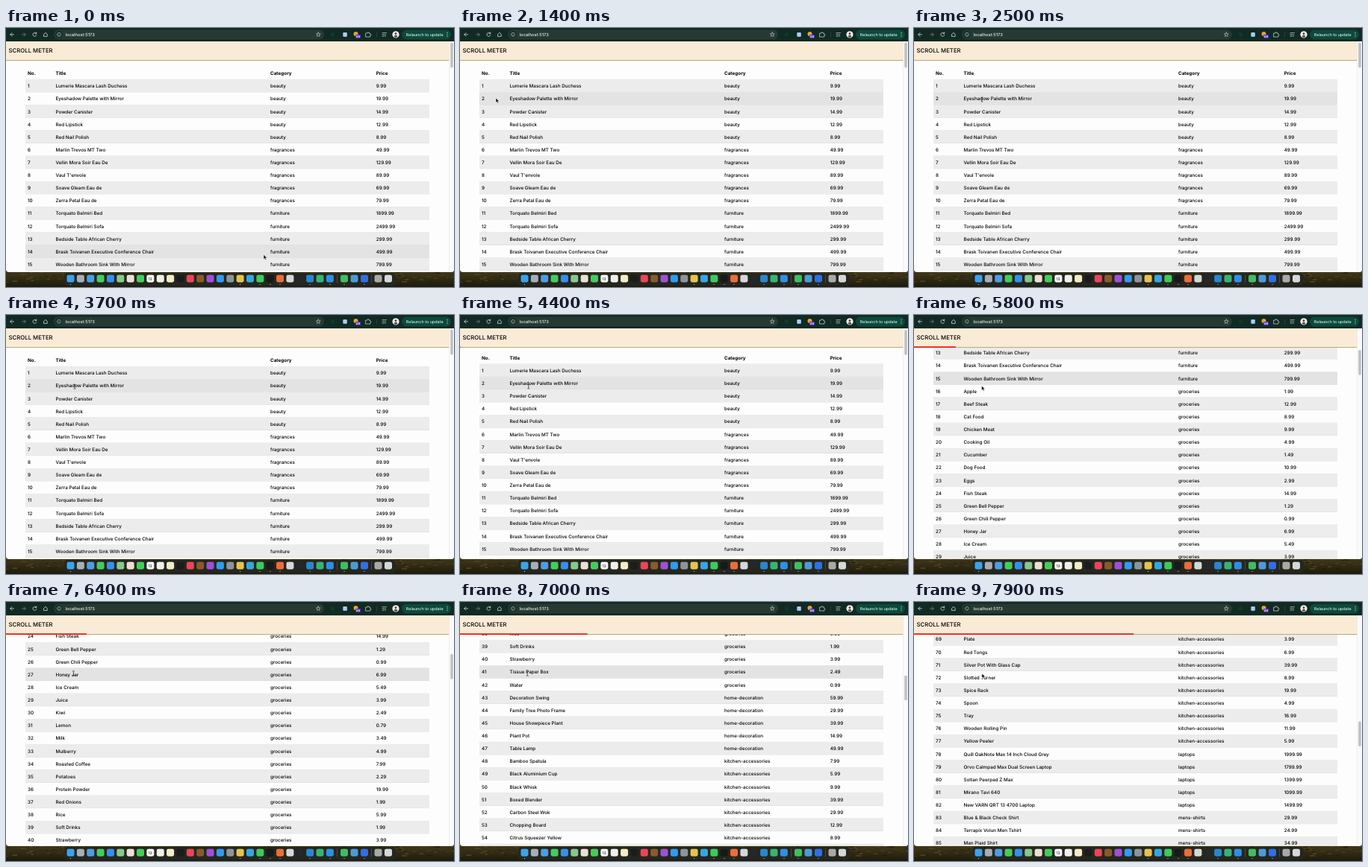
Animation of 600 by 348 pixels, one loop 8000 ms. Source, as an HTML page:

```html
<!DOCTYPE html>
<html lang="en">
<head>
<meta charset="utf-8">
<title>Scroll meter</title>
<style>
  html, body { margin: 0; width: 100%; height: 100%; overflow: hidden; background: #10261f; }
  svg { display: block; width: 100vw; height: 100vh; }
  text { font-family: Inter, Roboto, sans-serif; text-rendering: geometricPrecision; white-space: pre; }
</style>
</head>
<body>
<svg id="stage" viewBox="0 0 600 348" preserveAspectRatio="none">
  <defs>
    <clipPath id="pageClip"><path d="M0 18H600V324Q600 328 596 328H4Q0 328 0 324Z"/></clipPath>
    <linearGradient id="field" x2="0" y2="1">
      <stop offset="0.3" stop-color="#40381a"/><stop offset="1" stop-color="#1d1a0d"/>
    </linearGradient>
  </defs>
  <g id="desktop"><rect y="320" width="600" height="28" fill="url(#field)"/></g>
  <g clip-path="url(#pageClip)">
    <rect y="18" width="600" height="310" fill="#fdfdfd"/>
    <g id="table"></g>
    <rect y="18" width="594" height="25" fill="#faebd7"/>
    <rect y="43" width="594" height="1" fill="#b3ab7e"/>
    <rect id="meter" y="42.2" height="1.7" fill="#f5160c"/>
    <rect x="593.5" y="18" width="6.5" height="310" fill="#fafafa"/>
    <rect x="593.5" y="18" width=".5" height="310" fill="#e4e4e4"/>
    <rect id="thumb" x="595.2" y="19.5" width="3.6" height="34" rx="1.8" fill="#c1c1c1"/>
  </g>
  <g id="chrome"></g>
  <g id="pointer">
    <path id="arrow" d="M0 0V6.3L1.5 5L2.5 7.3L3.6 6.8L2.6 4.6H4.6Z" fill="#111" stroke="#fff" stroke-width=".5"/>
    <path id="beam" d="M-1.4 -3Q0 -3 0 -2.2Q0 -3 1.4 -3M0 -2.2V2.2M-1.4 3Q0 3 0 2.2Q0 3 1.4 3" fill="none" stroke="#222" stroke-width=".7"/>
  </g>
</svg>
<script>
const LOOP = 8000, STEP = 100;
const ROW = 17.12, TOP = 69.45;
const $ = id => document.getElementById(id);

function add(parent, tag, attrs, content) {
  const el = document.createElementNS('http://www.w3.org/2000/svg', tag);
  for (const key in attrs) el.setAttribute(key, attrs[key]);
  if (content !== undefined) el.textContent = content;
  parent.appendChild(el);
  return el;
}
const rect = (parent, x, y, width, height, fill, rx = 0) => add(parent, 'rect', { x, y, width, height, fill, rx });
const circle = (parent, cx, cy, r, fill) => add(parent, 'circle', { cx, cy, r, fill });
const label = (parent, x, middle, size, content, fill = '#000', weight = 500) =>
  add(parent, 'text', { x, y: middle + size * 0.36, 'font-size': size, fill, 'font-weight': weight }, content);
const stroke = (parent, d, color = '#d3ded9', width = 0.8) =>
  add(parent, 'path', { d, fill: 'none', stroke: color, 'stroke-width': width, 'stroke-linecap': 'round', 'stroke-linejoin': 'round' });

// Table contents by category: "title price" items.
const CATALOG = {
  'beauty': 'Lumerie Mascara Lash Duchess 9.99|Eyeshadow Palette with Mirror 19.99|Powder Canister 14.99|Red Lipstick 12.99|Red Nail Polish 8.99',
  'fragrances': "Marlin Trevos MT Two 49.99|Vellin Mora Soir Eau De 129.99|Vaul T'envole 89.99|Soave Gleam Eau de 69.99|Zerra Petal Eau de 79.99",
  'furniture': 'Torquato Belmiri Bed 1899.99|Torquato Belmiri Sofa 2499.99|Bedside Table African Cherry 299.99|Brask Toivanen Executive Conference Chair 499.99|Wooden Bathroom Sink With Mirror 799.99',
  'groceries': 'Apple 1.99|Beef Steak 12.99|Cat Food 8.99|Chicken Meat 9.99|Cooking Oil 4.99|Cucumber 1.49|Dog Food 10.99|Eggs 2.99|Fish Steak 14.99|Green Bell Pepper 1.29|Green Chili Pepper 0.99|Honey Jar 6.99|Ice Cream 5.49|Juice 3.99|Kiwi 2.49|Lemon 0.79|Milk 3.49|Mulberry 4.99|Roasted Coffee 7.99|Potatoes 2.29|Protein Powder 19.99|Red Onions 1.99|Rice 5.99|Soft Drinks 1.99|Strawberry 3.99|Tissue Paper Box 2.49|Water 0.99',
  'home-decoration': 'Decoration Swing 59.99|Family Tree Photo Frame 29.99|House Showpiece Plant 39.99|Plant Pot 14.99|Table Lamp 49.99',
  'kitchen-accessories': 'Bamboo Spatula 7.99|Black Aluminium Cup 5.99|Black Whisk 9.99|Boxed Blender 39.99|Carbon Steel Wok 29.99|Chopping Board 12.99|Citrus Squeezer Yellow 8.99|Egg Slicer 6.99|Electric Stove 49.99|Fine Mesh Strainer 9.99|Fork 3.99|Glass 4.99|Grater Black 10.99|Hand Blender 34.99|Ice Cube Tray 5.99|Kitchen Sieve 7.99|Knife 14.99|Lunch Box 12.99|Microwave Oven 89.99|Mug Tree Stand 15.99|Pan 24.99|Plate 3.99|Red Tongs 6.99|Silver Pot With Glass Cap 39.99|Slotted Turner 8.99|Spice Rack 19.99|Spoon 4.99|Tray 16.99|Wooden Rolling Pin 11.99|Yellow Peeler 5.99',
  'laptops': 'Quill OakNote Max 14 Inch Cloud Grey 1999.99|Orvo Calmpad Max Dual Screen Laptop 1799.99|Soltan Peerpad Z Max 1399.99|Mirano Tavi 640 1099.99|New VARN QRT 13 4700 Laptop 1499.99',
  'mens-shirts': 'Blue & Black Check Shirt 29.99|Terrapix Volun Men Tshirt 24.99|Man Plaid Shirt 34.99|Man Short Sleeve Shirt 19.99|Men Check Shirt 27.99|Sports Shirt 25.99|Striped Shirt 21.99|Linen Shirt 31.99'
};

const table = $('table');
const rows = [];
const cells = (middle, values, weight) =>
  [29, 66.5, 354, 495.7].forEach((x, i) => label(table, x, middle, 6.3, values[i], '#000', weight));

function buildTable() {
  cells(61, ['No.', 'Title', 'Category', 'Price'], 700);
  rect(table, 26, TOP - 0.5, 541, 0.5, '#d5d7d9');
  for (const [category, items] of Object.entries(CATALOG)) {
    for (const item of items.split('|')) {
      const n = rows.length, y = TOP + n * ROW, cut = item.lastIndexOf(' ');
      const bar = rect(table, 26, y, 541, ROW, '#fdfdfd');
      rect(table, 26, y + ROW - 0.5, 541, 0.5, '#d5d7d9');
      cells(y + ROW / 2, [n + 1, item.slice(0, cut), category, item.slice(cut + 1)]);
      rows.push(bar);
    }
  }
}

function buildChrome() {
  const g = $('chrome');
  rect(g, 0, 0, 600, 18, '#112a23');
  rect(g, 64, 2.3, 362, 13, '#263a33', 6.5);
  stroke(g, 'M10.5 8.8H5.8M8 6.5L5.7 8.8L8 11.1');
  stroke(g, 'M21.5 8.8H26.2M24 6.5L26.3 8.8L24 11.1', '#71857d');
  stroke(g, 'M40.4 7.2A2.5 2.5 0 1 0 40.8 9.6M40.7 5.8V7.6H38.9');
  stroke(g, 'M50.8 8.3L53 6.3L55.2 8.3V11.3H50.8Z');
  circle(g, 71, 8.8, 4.6, '#112a23');
  stroke(g, 'M71 8.5V10.5M71 6.9V7M68.4 8.8A2.6 2.6 0 1 1 73.6 8.8A2.6 2.6 0 1 1 68.4 8.8', '#d3ded9', 0.55);
  label(g, 79.5, 8.8, 5.75, 'localhost:5173', '#e9f0ec');
  stroke(g, 'M418.3 5.8L419.1 7.8L421.2 7.9L419.6 9.3L420.1 11.4L418.3 10.2L416.5 11.4L417 9.3L415.4 7.9L417.5 7.8Z', '#d3ded9', 0.6);
  circle(g, 437.5, 8.8, 3, '#0d3a26');
  rect(g, 451.3, 6, 5.5, 5.8, '#a9cdf5', 1);
  circle(g, 468.5, 8, 3, '#e8a13a');
  rect(g, 468, 9, 7, 4.8, '#5a35c8', 1);
  label(g, 469, 11.4, 4, '59', '#fff', 600);
  stroke(g, 'M482 7H484Q484 5.5 485 5.5T486 7H487.7V8.6Q489 8.6 489 9.5T487.7 10.4V12H482Z', '#d3ded9', 0.7);
  rect(g, 496.3, 5.5, 0.5, 7, '#3b524a');
  stroke(g, 'M504 6.6H509.5M504 8.8H507M504 11H506.5M508.2 8.8V11.2', '#d3ded9', 0.7);
  circle(g, 522, 8.8, 4.6, '#f1efec');
  circle(g, 522, 7.6, 1.4, '#4c3b33');
  add(g, 'path', { d: 'M519.8 12Q519.8 9.6 522 9.6T524.2 12Q522 13.4 519.8 12Z', fill: '#5a4a44' });
  rect(g, 530, 2.6, 66, 12.6, '#0c4a3c', 6.3);
  label(g, 535.8, 8.8, 5.42, 'Relaunch to update', '#d2f0e3');
  [6.4, 8.8, 11.2].forEach(y => circle(g, 591, y, 0.6, '#d2f0e3'));
  label(g, 3.6, 30.5, 7.75, 'SCROLL METER');
}

function buildDesktop() {
  const g = $('desktop');
  let seed = 7;
  const random = () => (seed = seed * 16807 % 2147483647) / 2147483647;
  const tones = ['#4a3f1b', '#2a2812', '#574822', '#1b1b0e'];
  for (let i = 0; i < 200; i++) {
    rect(g, random() * 600, 328 + random() * 14, 2 + random() * 5, 0.6 + random(), tones[i % 4]);
  }
  rect(g, 78, 329.3, 444, 17, '#25271f', 4.5);
  const colors = ['#39a3ee', '#a9adb5', '#4a9ee6', '#41cf5b', '#358ff0', '#86c98a', '#ece0d4', '#41cf5b',
    '#f7f7f7', '#f1efea', '#f4ecc6', '#1c1c1e', '#ef4358', '#8a5a2b', '#a04fd8', '#2f9bf3', '#8f949b', '#e6c34c',
    '#35a6e2', '#3ccb5c', '#17191b', '#ee6c3a', '#d5d7d8', '#25272b', '#2b86cf', '#36b476', '#2f8fe4'];
  const icon = (x, color) => rect(g, x - 5, 331.7, 10, 10, color, 2.4);
  colors.forEach((color, i) => icon(86.5 + i * 13.36, color));
  label(g, 190.4, 337.2, 5, '13', '#333');
  [[453, '#3dbf62'], [466.5, '#4a9bd8'], [480, '#2f6fe8'], [498.5, '#a9aaa6'], [512, '#d4d8d8']].forEach(([x, c]) => icon(x, c));
  [443.5, 489.5].forEach(x => rect(g, x, 331.5, 0.5, 11, '#6e7168'));
  [86.5, 313.6, 340, 354, 367, 407, 434, 453, 480].forEach(x => circle(g, x, 344.6, 0.6, '#d8d8d2'));
}

// Smooth cubic through [time, value...] keys.
function curve(keys, t, column) {
  const last = keys.length - 1;
  if (t <= keys[0][0]) return keys[0][column];
  if (t >= keys[last][0]) return keys[last][column];
  const i = keys.findIndex(key => key[0] > t) - 1;
  const slope = k => {
    if (k === 0) return 0;
    const a = keys[k - 1], b = keys[Math.min(k + 1, last)];
    return (b[column] - a[column]) / (b[0] - a[0]);
  };
  const [a, b] = [keys[i], keys[i + 1]];
  const span = b[0] - a[0], u = (t - a[0]) / span, v = 1 - u;
  return a[column] * v * v * (1 + 2 * u) + b[column] * u * u * (3 - 2 * u)
    + span * (slope(i) * u * v * v - slope(i + 1) * u * u * v);
}

function eased(keys, t) {
  const i = keys.findIndex(key => key[0] > t);
  if (i < 0) return keys[keys.length - 1].slice(1);
  const a = keys[i - 1], b = keys[i];
  const u = (t - a[0]) / (b[0] - a[0]), e = u * u * (3 - 2 * u);
  return [a[1] + (b[1] - a[1]) * e, a[2] + (b[2] - a[2]) * e];
}

const scrollKeys = [ // time, page offset, meter width
  [4300, 0, 0], [5100, 116, 22], [5800, 232.4, 56], [7000, 668.6, 170.5], [7900, 1192, 294]
];
const pointerKeys = [ // time, x, y
  [0, 345, 304.5], [400, 345, 304.5], [1300, 48, 94], [1500, 48, 94], [2600, 92, 96.3],
  [4200, 92, 96.3], [5100, 90.5, 95.3], [5800, 90.5, 95], [7000, 90.3, 96.3], [7900, 91, 96]
];
const FLICK = 7100; // fast scrolling drops the hover
const HOVER_STEP = 300, HOVER_PHASE = 100;
const within = (t, ranges) => ranges.some(([from, to]) => t >= from && t < to);
const beamTimes = [[2100, 5500], [6400, 7500]];

// While the page scrolls, the hovered row is only refreshed now and then.
function hoveredRow(t) {
  if (t >= FLICK) return -1;
  const seen = t < scrollKeys[0][0] ? t : Math.floor((t - HOVER_PHASE) / HOVER_STEP) * HOVER_STEP + HOVER_PHASE;
  return Math.floor((eased(pointerKeys, seen)[1] - 1.5 + curve(scrollKeys, seen, 1) - TOP) / ROW);
}

function draw(t) {
  const offset = curve(scrollKeys, t, 1);
  const [x, y] = eased(pointerKeys, t);
  table.setAttribute('transform', `translate(0 ${-offset})`);
  $('meter').setAttribute('width', curve(scrollKeys, t, 2));
  $('thumb').setAttribute('y', 19.5 + offset * 0.118);

  const hovered = hoveredRow(t);
  rows.forEach((row, i) => row.setAttribute('fill', i === hovered ? '#e3e3e3' : i % 2 ? '#fdfdfd' : '#ececec'));

  const beam = within(t, beamTimes);
  $('pointer').setAttribute('transform', `translate(${x} ${y})`);
  $('arrow').style.display = beam ? 'none' : '';
  $('beam').style.display = beam ? '' : 'none';
}

buildTable();
buildChrome();
buildDesktop();

const start = performance.now();
function tick() {
  const t = (performance.now() - start) % LOOP;
  draw(Math.floor(t / STEP) * STEP);
  requestAnimationFrame(tick);
}
tick();
</script>
</body>
</html>
```
